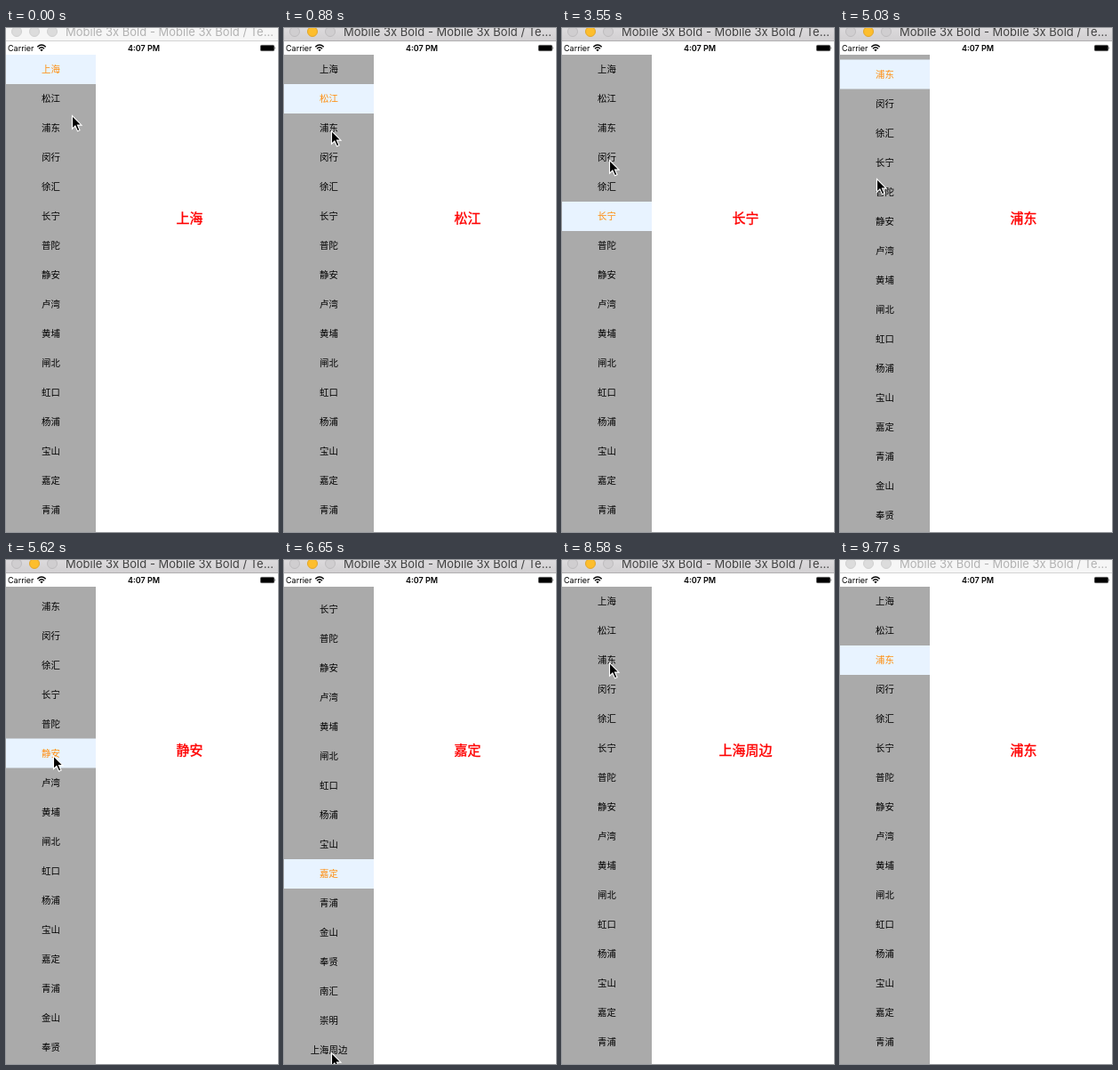
Animation, 306 px wide and 566 px high, one loop 9870 ms. Source, as an HTML page:

```html
<!DOCTYPE html>
<html lang="zh-CN">
<head>
<meta charset="utf-8">
<title>District list</title>
<style>
  html, body { margin: 0; width: 100%; height: 100%; overflow: hidden; background: #fff; }
  #stage { position: relative; width: 306px; height: 566px; overflow: hidden; background: #fff;
    font-family: "Noto Sans CJK SC", "Noto Sans CJK", sans-serif; }
  #stage > * { position: absolute; }
  #titlebar { left: 0; top: 0; width: 306px; height: 14px; overflow: hidden;
    background: #f6f6f6; border-bottom: 1px solid #d4d4d4; color: #b2b2b2; }
  #titlebar.active { background: linear-gradient(#dcdadc, #d2d0d2); border-color: #b1afb1; color: #404040; }
  #titlebar i { position: absolute; top: -2px; width: 10px; height: 10px; border-radius: 50%;
    background: #dcdcdc; border: 1px solid #d0d0d0; }
  #titlebar.active i { background: #d0ced0; border-color: #bebcbe; }
  #titlebar.active i:nth-child(2) { background: #fdbe2d; border-color: #e2a62a; }
  #titlebar span { position: absolute; left: 67px; top: -5px; white-space: nowrap;
    font: 13px/18px Inter, sans-serif; }
  #status { left: 0; top: 15px; }
  #list { left: 0; top: 30px; width: 101px; height: 536px; overflow: hidden; background: #aaa; }
  #rows div { height: 33px; line-height: 32px; font-size: 10.4px; text-align: center; color: #000; }
  #rows .on { background: #e8f3ff; color: #ff8c0a; }
  #label { left: 106.5px; top: 198px; width: 200px; text-align: center;
    font-size: 15px; line-height: 30px; color: #f00; -webkit-text-stroke: .4px #f00; }
  #cursor { left: 0; top: 0; overflow: visible; }
</style>
</head>
<body>
<div id="stage">
  <div id="titlebar">
    <i style="left:6px"></i><i style="left:26px"></i><i style="left:46px"></i>
    <span>Mobile 3x Bold - Mobile 3x Bold / Te...</span>
  </div>
  <svg id="status" width="306" height="15" font-family="Inter, sans-serif" font-size="9">
    <text x="2" y="11">Carrier</text>
    <path d="M35.3 6.2Q40 1.8 44.7 6.2M37 8.2Q40 5.4 43 8.2" fill="none" stroke="#000" stroke-width="1.4"/>
    <path d="M38.3 9.5Q40 8 41.7 9.5L40 11.3Z"/>
    <text x="155" y="11" text-anchor="middle" font-weight="600">4:07 PM</text>
    <rect x="286.4" y="4.4" width="15.2" height="6.2" rx="1.2" stroke="#444" stroke-width=".8"/>
    <path d="M302.6 6q1.2 1.5 0 3z"/>
  </svg>
  <div id="list"><div id="rows"></div></div>
  <div id="label"></div>
  <svg id="cursor" width="12" height="20">
    <path d="M.5 .5V15.2L3.9 12L6.5 17.8L9 16.7L6.5 11.1H11Z" stroke="#fff" stroke-width="1.1"/>
  </svg>
</div>
<script>
const LOOP = 9870, TICK = 148, ROW = 33, LIST_TOP = 30;
const FOCUS = 3, BLUR = 66, POINTER_GONE = 62, CLICK_DELAY = 2;
const names = "上海 松江 浦东 闵行 徐汇 长宁 普陀 静安 卢湾 黄埔 闸北 虹口 杨浦 宝山 嘉定 青浦 金山 奉贤 南汇 崇明 上海周边".split(" ");

// The pointer glides to each target; picks click a row shortly after arriving, drags scroll the list on the way.
const moves = [];
let listOffset = 0;
function glide(from, to, x, y, name) {
  moves.push({ from, to, x, y, name, offset: listOffset });
}
function pick(name, from, to = from) {
  glide(from, to, 53, LIST_TOP + names.indexOf(name) * ROW - listOffset + 19, name);
}
function drag(offset, from, to, x, y) {
  listOffset = offset;
  glide(from, to, x, y);
}

pick("松江", 0, 4);
pick("浦东", 6);
pick("闵行", 8, 10);
pick("长宁", 12, 14);
pick("黄埔", 16, 19);
pick("长宁", 21, 22);
pick("闵行", 24);
pick("浦东", 26);
drag(60.5, 30, 34, 41, 169);
pick("静安", 34, 35);
drag(156, 38, 41, 48, 350);
pick("嘉定", 41);
pick("上海周边", 43, 45);
drag(-10.5, 47, 53, 39, 202);
drag(0, 53, 56, 39, 202);
pick("浦东", 57, 58);
glide(60, 61, 234, 540);

const smooth = p => p * p * (3 - 2 * p);
const progress = (tick, { from, to }) =>
  tick >= to ? 1 : tick <= from ? 0 : smooth((tick - from) / (to - from));

function stateAt(tick) {
  const state = { x: 74, y: 98, offset: 0, chosen: names[0] };
  for (const move of moves) {
    const p = progress(tick, move);
    for (const key of ["x", "y", "offset"]) state[key] += (move[key] - state[key]) * p;
    if (move.name && tick >= move.to + CLICK_DELAY) state.chosen = move.name;
  }
  return state;
}

const $ = id => document.getElementById(id);
const rows = names.map(name => {
  const row = document.createElement("div");
  row.textContent = name;
  $("rows").append(row);
  return row;
});

function draw(time) {
  const tick = Math.floor((time % LOOP + 10) / TICK);
  const { x, y, offset, chosen } = stateAt(tick);
  rows.forEach((row, i) => row.classList.toggle("on", names[i] === chosen));
  $("label").textContent = chosen;
  $("titlebar").classList.toggle("active", tick >= FOCUS && tick < BLUR);
  $("rows").style.transform = `translateY(${-offset}px)`;
  $("cursor").style.transform = `translate(${x}px, ${y}px)`;
  $("cursor").style.visibility = tick < POINTER_GONE ? "visible" : "hidden";
}

const start = performance.now();
function loop() {
  draw(performance.now() - start);
  requestAnimationFrame(loop);
}
loop();
</script>
</body>
</html>
```
